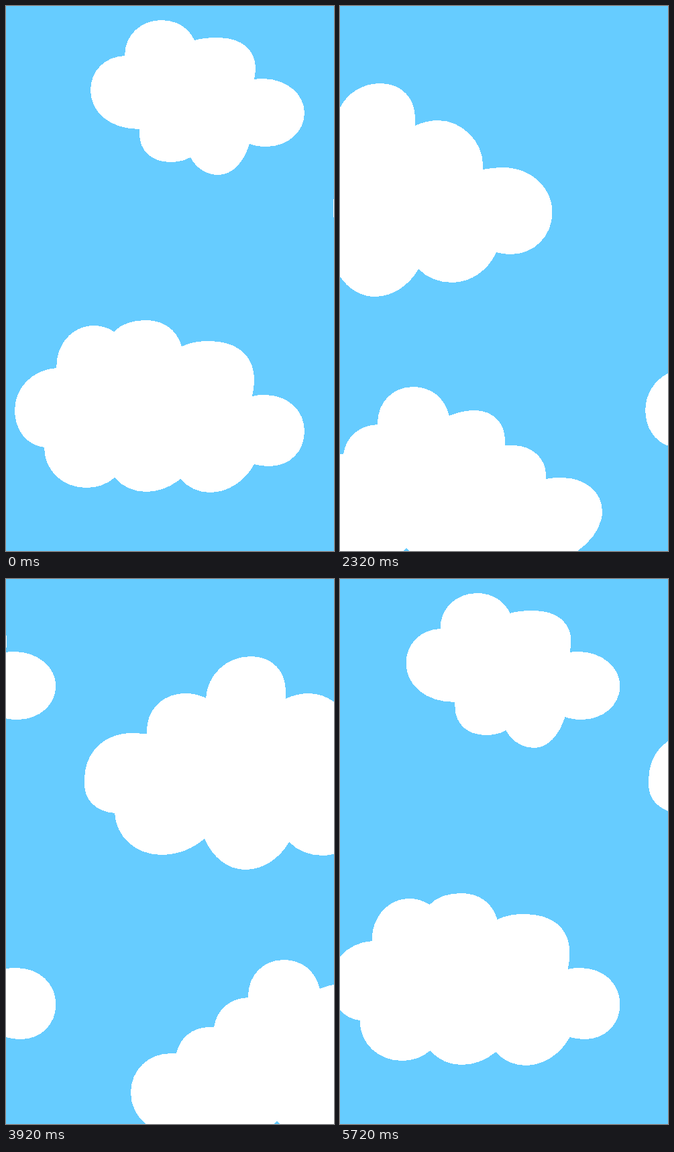
Write an HTML page that moves like this. It is 489x810 px and loops after 5.76 s.

```html
<!DOCTYPE html>
<html lang="en">
<head>
<meta charset="utf-8">
<title>Drifting clouds</title>
<style>
  html, body { margin: 0; width: 100%; height: 100%; overflow: hidden; background: #6cf; }
  svg { display: block; width: 100%; height: 100%; }
</style>
</head>
<body>
<svg viewBox="0 0 489 810" shape-rendering="crispEdges">
  <defs>
    <g id="clouds" fill="#fff">
      <path d="M177 74 C177 42 202 21 232 21 C255 21 273 33 281 51
        C290 48 303 47 316 47 C352 47 372 66 372 92 C372 98 371 104 370 109
        C374 108 378 108 383 108 C418 108 445 131 445 159 C445 187 420 209 388 209 C379 209 371 208 363 205
        C354 233 337 251 317 251 C300 251 284 242 275 225
        C266 230 256 232 245 232 C217 232 199 215 199 190 V183
        C155 183 126 158 126 125 C126 97 147 75 177 74Z"/>
      <path d="M75.500 538 C74 503 99 475 131 475 C142 475 152 478 161 484
        C172 472 190 467 208 467 C236 467 255 482 262 506
        C274 500 288 498 302 498 C348 498 370 522 370 556 C370 564 369 572 367 580
        C373 578 380 578 386 578 C420 578 445 601 445 632 C445 662 423 684 393 684 C385 684 377 683 370 681
        C356 707 330 723 304 723 C288 723 271 716 260 703
        C245 715 228 722 209 722 C191 722 174 715 162 701
        C150 711 136 716 120 716 C85 716 57 691 57 656
        C31 653 13 630 13 601 C13 566 41 540 75.500 538Z"/>
      <g transform="translate(-747.25)">
        <path d="M162 348 C134 346 117 328 117 306 V298 C117 257 147 229 188 229 L210 230
          C208 194 234 170 268 170 C280 170 290 173 298 177
          C300 143 328 115 365 115 C397 115 417 137 417 167 V178
          C427 173 439 170 451 170 C488 170 518 203 518 235 V243
          C527 241 538 240 548 240 C590 240 621.500 270 621.500 307 C621.500 342 594 369 560 369 C552 369 545 368 538 366
          C526 393 500 411 472 411 C453 411 435 404 422 391
          C408 415 384 432 357 432 C331 432 309 415 296 386
          C277 402 255 410 232 410 C193 410 164 383 162 348Z"/>
        <path d="M208 810 C194 798 186 782 186 763 C186 730 212 705 246 705 H254
          C259 682 278 666 303 666 H310
          C314 640 334 623 361 622
          C360 590 383 566 414 566 C441 566 461 582 468 609
          C480 604 493 601 506 601 C533 601 551 620 551 645 V653
          H563 C591 653 612 672 612 697 V703
          C620 701 628 701 636 701 C670 701 696 722 696 751 C696 773 681 795 659 810
          H409 L404 806 L399 810Z"/>
      </g>
    </g>
  </defs>
  <rect width="489" height="810" fill="#6cf"/>
  <g id="sky">
    <use href="#clouds"/>
    <use href="#clouds" x="-1117.9"/>
    <use href="#clouds" x="1117.9"/>
  </g>
</svg>
<script>
  const LOOP = 5760, STEP = 40, STRIDE = 7.625;
  const sky = document.getElementById('sky');
  const start = performance.now();

  function draw(time) {
    const step = Math.floor((time % LOOP) / STEP);
    sky.setAttribute('transform', `translate(${step * STRIDE})`);
  }

  function tick() {
    draw(performance.now() - start);
    requestAnimationFrame(tick);
  }
  tick();
</script>
</body>
</html>
```
